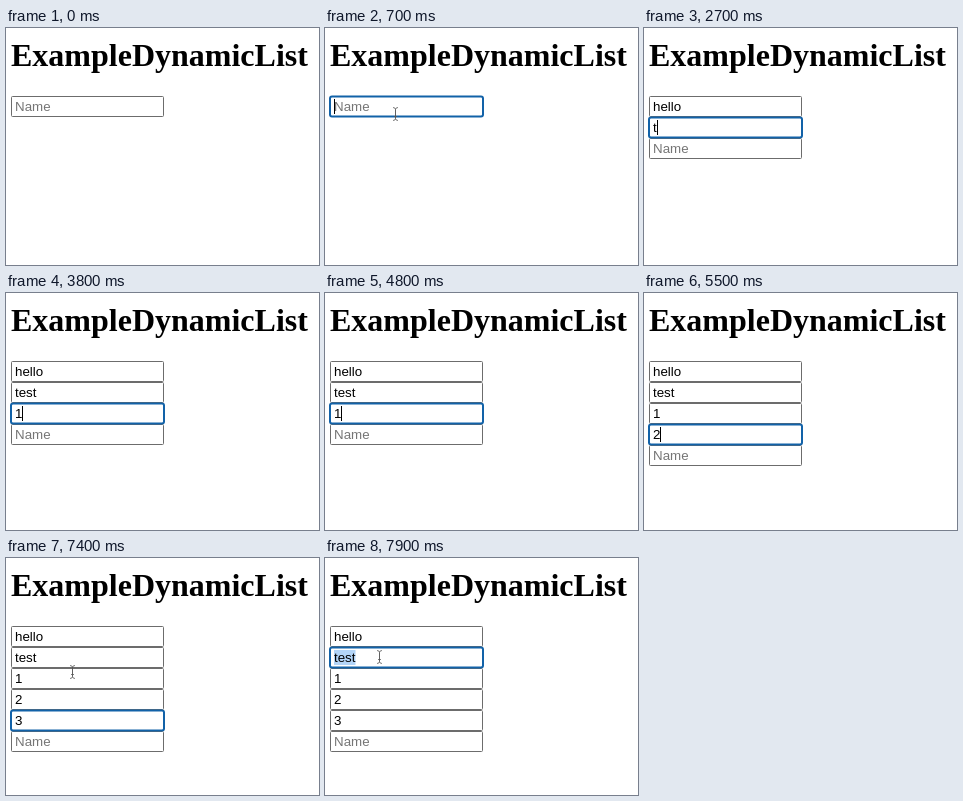
Recreate the animation shown at these times as an HTML page. Size 313x237 px, loop 8000 ms.

```html
<!DOCTYPE html>
<html lang="en">
<meta charset="utf-8">
<title>Dynamic list</title>
<style>
  html, body { margin: 0; width: 100%; height: 100%; overflow: hidden; background: #fff; }
  svg { display: block; width: 100%; height: 100%; }
  h1, text { font-family: "Liberation Sans", Arial, sans-serif; font-size: 13.333px; }
  .title { font: bold 32px "Liberation Serif", Times, serif; }
  .box { fill: #fff; stroke: #6c6c6c; }
  .ring { fill: none; stroke: #1262a8; stroke-width: 2; }
  .hint { fill: #757575; }
  .beam { fill: none; stroke: #555; opacity: .75; }
  .arrow { fill: #000; stroke: #fff; }
</style>
<svg viewBox="0 0 313 237">
  <text class="title" x="5" y="38">ExampleDynamicList</text>
  <g id="rows"></g>
  <rect id="ring" class="ring" x="5" width="153" height="20" rx="2"></rect>
  <rect id="caret" width="1" height="15"></rect>
  <path id="beam" class="beam" d="M-2.5-6.5Q0-6.5 0-4.5V4.5Q0 6.5-2.5 6.5M2.5-6.5Q0-6.5 0-4.5V4.5Q0 6.5 2.5 6.5M-1.5 2.5H1.5"></path>
  <path id="arrow" class="arrow" d="M0 0V14L3.3 11 5.5 16 8 15 5.8 10H10Z"></path>
</svg>
<script>
const LOOP = 8000, TOP = 68, PITCH = 21, LEFT = 9;
const $ = id => document.getElementById(id);
const type = (row, value) => ({ row, value, caret: true });
const focus = row => ({ focus: row, caret: true });
const blink = on => ({ caret: on });

// Each event is a time and the changes it makes.
const events = [
  [300, { arrow: [84, 111] }], [400, { arrow: [81, 101] }],
  [600, { arrow: null, beam: [70, 86] }], [700, focus(0)], [1300, blink(false)],
  [1500, type(0, "h")], [1700, type(0, "he")], [1800, type(0, "hel")],
  [1900, type(0, "hell")], [2000, type(0, "hello")],
  [2200, { ...focus(1), beam: null }],
  [2700, type(1, "t")], [2800, type(1, "te")], [2900, type(1, "test")],
  [3400, blink(false)], [3500, focus(2)], [3800, type(2, "1")],
  [4300, blink(false)], [4800, blink(true)], [5000, focus(3)],
  [5500, type(3, "2")], [5900, focus(4)], [6500, blink(false)],
  [6600, type(4, "3")],
  [7100, { caret: false, beam: [112, 176] }], [7200, { beam: [97, 155] }],
  [7300, { beam: [80, 132] }], [7400, { beam: [66, 114] }],
  [7500, { beam: [58, 103] }], [7600, { beam: [54, 99] }],
  [7700, focus(1)], [7900, { caret: false, selected: true }]
];

const rows = Array.from({ length: 6 }, (_, i) => {
  const y = TOP + i * PITCH;
  const g = document.createElementNS("http://www.w3.org/2000/svg", "g");
  g.innerHTML = `<rect class="box" x="5.5" y="${y + .5}" width="152" height="20" rx="1"/>
    <rect class="mark" x="${LEFT}" y="${y + 3}" height="15" fill="#b3d5f8"/>
    <text x="${LEFT}" y="${y + 15}"></text>`;
  $("rows").append(g);
  return { g, y, text: g.querySelector("text"), mark: g.querySelector(".mark") };
});

const show = (el, on) => el.setAttribute("visibility", on ? "visible" : "hidden");
const place = (el, at) => {
  show(el, at);
  if (at) el.setAttribute("transform", `translate(${at[0] + .5} ${at[1]})`);
};

function stateAt(time) {
  const state = { values: [], focus: -1 };
  for (const [start, change] of events) {
    if (start > time) break;
    Object.assign(state, change);
    if ("value" in change) state.values[change.row] = change.value;
  }
  return state;
}

function draw(time) {
  const s = stateAt(time);
  rows.forEach(({ g, text, mark }, i) => {
    const value = s.values[i] || "", label = value || "Name";
    g.style.display = i <= s.values.length ? "" : "none";
    if (text.textContent !== label) text.textContent = label;
    text.setAttribute("class", value ? "" : "hint");
    mark.setAttribute("width", s.selected && i === s.focus ? text.getComputedTextLength() : 0);
  });

  const active = rows[s.focus];
  show($("ring"), active);
  show($("caret"), active && s.caret);
  if (active) {
    const width = s.values[s.focus] ? active.text.getComputedTextLength() : 0;
    $("ring").setAttribute("y", active.y + .5);
    $("caret").setAttribute("x", Math.round(LEFT + width));
    $("caret").setAttribute("y", active.y + 3);
  }
  place($("beam"), s.beam);
  place($("arrow"), s.arrow);
}

const begin = performance.now();
function tick() {
  draw((performance.now() - begin) % LOOP);
  requestAnimationFrame(tick);
}
tick();
</script>
</html>
```
